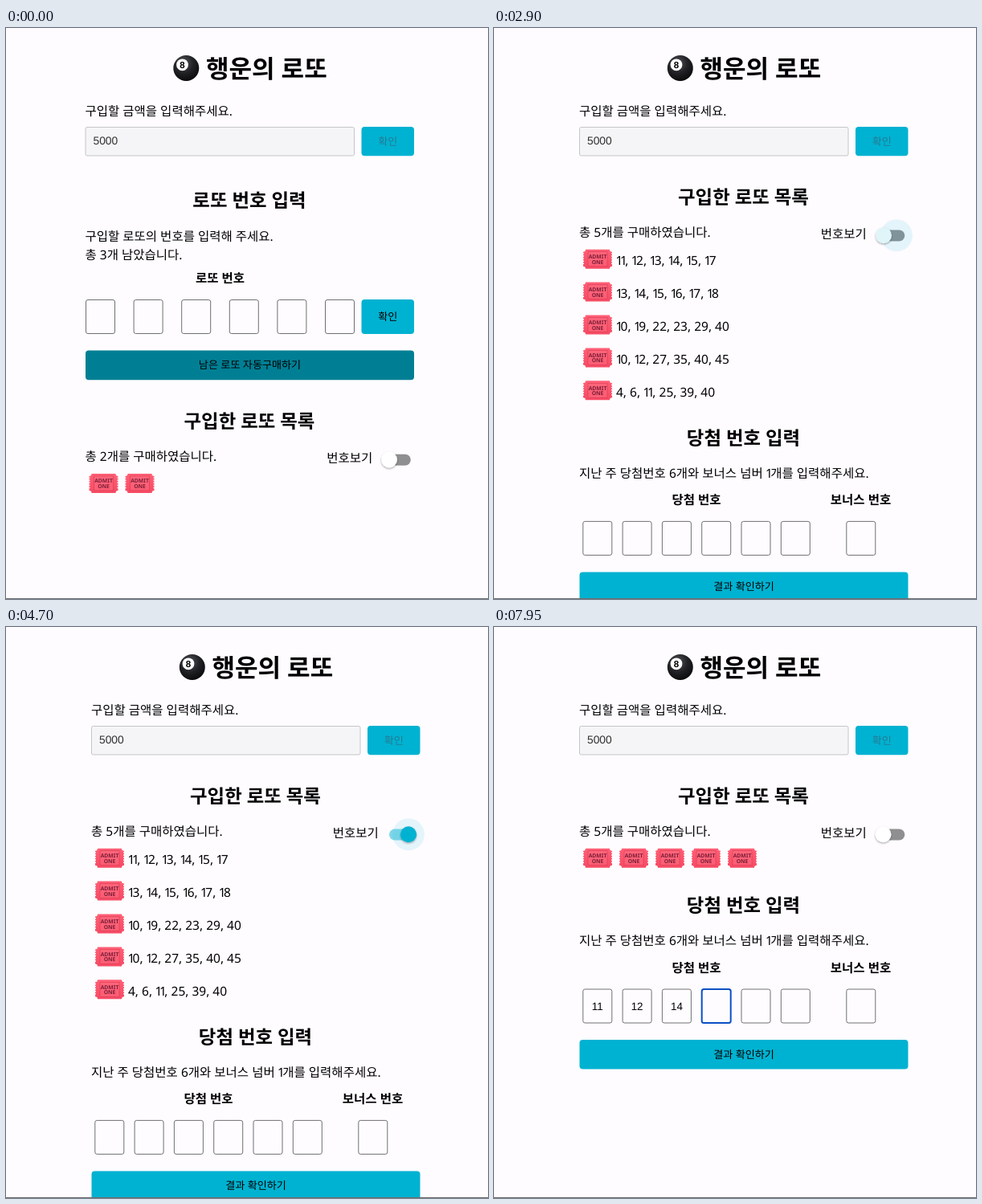
Recreate the animation shown at these times as an HTML page. Size 600x711 px, loop 8000 ms.

```html
<!DOCTYPE html>
<html lang="ko">
<head>
<meta charset="utf-8">
<title>행운의 로또</title>
<style>
  html, body { margin: 0; width: 100%; height: 100%; overflow: hidden; background: #fefcff; }
  svg { display: block; width: 600px; height: 711px; }
  text { font: 500 15.5px 'Noto Sans', 'Noto Sans CJK KR', 'Noto Sans CJK JP', sans-serif; text-rendering: geometricPrecision; white-space: pre; }
  .title { font-size: 31px; font-weight: 700; }
  .heading { font-size: 23.4px; font-weight: 700; }
  .label { font-weight: 700; }
  .button { font-size: 13.1px; }
  .input { font: 13.4px 'Liberation Sans', Arial, sans-serif; }
  .amount { font: 13.8px 'Liberation Sans', Arial, sans-serif; fill: #303030; }
  .stub { font: 700 6.8px 'Noto Sans', sans-serif; font-stretch: extra-condensed; fill: #7c1f38; }
  .eight { font: 700 11.5px 'Liberation Sans', Arial, sans-serif; }
</style>
</head>
<body>
<svg viewBox="0 0 600 711">
  <defs>
    <radialGradient id="ball" cx=".4" cy=".3" r=".75">
      <stop offset="0" stop-color="#55565a"/>
      <stop offset=".5" stop-color="#222326"/>
      <stop offset="1" stop-color="#08080a"/>
    </radialGradient>
    <linearGradient id="paper" x2="0" y2="1">
      <stop offset="0" stop-color="#ff6076"/>
      <stop offset="1" stop-color="#f64a64"/>
    </linearGradient>
    <filter id="shadow" x="-50%" y="-50%" width="200%" height="200%">
      <feDropShadow dx="0" dy="1.2" stdDeviation="1.3" flood-opacity=".38"/>
    </filter>
    <g id="ticket">
      <path d="M3 0H33Q33 3 36 3V21Q33 21 33 24H3Q3 21 0 21V3Q3 3 3 0Z" fill="url(#paper)"/>
      <path d="M.4 4.5V20M35.6 4.5V20" stroke="#fefcff" stroke-width="1.2" stroke-dasharray="1.4 1.7"/>
      <rect x="6" y="3" width="24" height="18" fill="#ff7084" fill-opacity=".45" stroke="#d93853" stroke-width=".6"/>
      <text class="stub" x="18" y="11.6" text-anchor="middle">ADMIT</text>
      <text class="stub" x="18" y="18" text-anchor="middle">ONE</text>
    </g>
  </defs>
  <g id="scene"></g>
  <path d="M0 710.5H600" stroke="#6c6c6e"/>
</svg>
<script>
const DURATION = 8000;
const CYAN = '#00b2d1', DARK_CYAN = '#007f94';
const PURCHASED = 450;                    // all tickets bought, winning form appears
const TOGGLES = [2885, 3500, 4150, 4750]; // alternately on and off
const HOVER = [2650, 5200];
const REFOCUS = 5200;
const KEYS = [[5850, '1'], [6050, '1'], [6350, '1'], [6500, '2'], [6850, '1'], [7350, '4']];
const TICKETS = [
  '11, 12, 13, 14, 15, 17',
  '13, 14, 15, 16, 17, 18',
  '10, 19, 22, 23, 29, 40',
  '10, 12, 27, 35, 40, 45',
  '4, 6, 11, 25, 39, 40'
];

const scene = document.getElementById('scene');
const clamp = v => Math.min(1, Math.max(0, v));
const smooth = v => v * v * (3 - 2 * v);
const mix = (a, b, k) => `rgb(${a.map((v, i) => Math.round(v + (b[i] - v) * k))})`;
const times = (n, draw) => Array.from({ length: n }, (_, i) => draw(i)).join('');
const shift = (x, y, content) => `<g transform="translate(${x} ${y})">${content}</g>`;

const text = (content, x, y, cls = '', attrs = '') =>
  `<text class="${cls}" x="${x}" y="${y}" ${attrs}>${content}</text>`;
const centered = (content, x, y, cls, attrs = '') =>
  text(content, x, y, cls, `text-anchor="middle" ${attrs}`);
// The digit 1 is set proportionally in running text.
const prose = (content, x, y) =>
  text(content.replace(/1/g, '<tspan dx="-.04em" letter-spacing="-.17em">1</tspan>'), x, y);

const button = (label, x, y, w, h, fill = CYAN, ink = '#000') =>
  `<rect x="${x}" y="${y}" width="${w}" height="${h}" rx="4" fill="${fill}"/>` +
  centered(label, x + w / 2, y + h / 2 + 4.4, 'button', `fill="${ink}"`);

function numberBox(x, y, value = '', focused = false, caret = false) {
  const stroke = focused ? 'stroke="#0a50c4" stroke-width="2"' : 'stroke="#6f6f72"';
  const caretX = x + 18.3 + value.length * 3.7;
  return `<rect x="${x}" y="${y}" width="36" height="42" rx="2.5" fill="none" ${stroke}/>` +
    centered(value, x + 18, y + 25.5, 'input') +
    (caret ? `<path d="M${caretX} ${y + 13}v16" stroke="#000"/>` : '');
}

const header = () =>
  `<circle cx="231.8" cy="50" r="16" fill="url(#ball)"/>
   <circle cx="227" cy="45.8" r="7.4" fill="#fff"/>` +
  centered('8', 227, 49.9, 'eight') +
  text('행운의 로또', 256.5, 61.5, 'title') +
  prose('구입할 금액을 입력해주세요.', 106, 109) +
  `<rect x="106.5" y="123.5" width="334.5" height="35.5" rx="2" fill="#f5f4f6" stroke="#c6c5c8"/>` +
  text('5000', 116, 145.3, 'amount') +
  button('확인', 450, 123, 65.5, 36.3, CYAN, '#237b95');

const manualForm = () =>
  centered('로또 번호 입력', 310.5, 223, 'heading') +
  prose('구입할 로또의 번호를 입력해 주세요.', 106, 264.5) +
  prose('총 3개 남았습니다.', 106, 288) +
  centered('로또 번호', 274, 317, 'label') +
  times(6, i => numberBox(107 + 59.6 * i, 338.5)) +
  button('확인', 450, 338, 65.5, 43) +
  button('남은 로또 자동구매하기', 106.5, 401.5, 409, 36.7, DARK_CYAN);

function switchState(t) {
  const flips = TOGGLES.filter(at => t >= at).length;
  const on = flips % 2 === 1;
  const progress = flips ? clamp((t - TOGGLES[flips - 1]) / 150) : 1;
  return { on, k: on ? smooth(progress) : 1 - smooth(progress) };
}

function toggle(t, { on, k }) {
  const hovered = t >= HOVER[0] && t < HOVER[1];
  const halo = on ? 'fill="#00b2d1" fill-opacity=".1"' : 'fill="#000" fill-opacity=".04"';
  const thumb = mix([255, 255, 255], [0, 178, 209], k ** .6);
  return `<rect x="477" y="251.5" width="34.3" height="14" rx="7" fill="${mix([143, 142, 144], [128, 215, 231], k)}"/>` +
    (hovered ? `<circle cx="${on ? 501 : 484.5}" cy="258.3" r="20" ${halo}/>` : '') +
    `<circle cx="${484.5 + 16.5 * k}" cy="258.3" r="10" fill="${thumb}" filter="url(#shadow)"/>`;
}

function ticketList(count, t, state) {
  const ticket = (x, y) => `<use href="#ticket" x="${x}" y="${y}"/>`;
  return centered('구입한 로또 목록', 310.5, 219, 'heading') +
    prose(`총 ${count}개를 구매하였습니다.`, 106, 260.3) +
    text('번호보기', 406.7, 262) +
    toggle(t, state) +
    times(count, i => state.on
      ? ticket(111, 275.7 + 40.9 * i) + prose(TICKETS[i], 152, 295 + 40.9 * i)
      : ticket(111 + 45 * i, 275.7));
}

function winningForm(t) {
  const pressed = KEYS.filter(([at]) => t >= at);
  const digits = pressed.map(([, key]) => key).join('');
  const hasFocus = t < TOGGLES[0] || t >= REFOCUS;
  const active = hasFocus ? Math.floor(digits.length / 2) : -1;
  const lastInput = pressed.length ? pressed[pressed.length - 1][0] : t >= REFOCUS ? REFOCUS : PURCHASED;
  const caretOn = (t - lastInput) % 1000 < 500;
  return centered('당첨 번호 입력', 310.5, 355.2, 'heading') +
    prose('지난 주 당첨번호 6개와 보너스 넘버 1개를 입력해주세요.', 106, 396.3) +
    centered('당첨 번호', 252, 430, 'label') +
    centered('보너스 번호', 456.5, 430, 'label') +
    times(6, i => numberBox(110.8 + 49.3 * i, 451, digits.slice(2 * i, 2 * i + 2),
      i === active, i === active && caretOn)) +
    numberBox(438.8, 451) +
    button('결과 확인하기', 106.5, 514, 409, 36.5);
}

function draw(t) {
  const state = switchState(t);
  if (t < PURCHASED) {
    return shift(-7.5, 0, header() + manualForm() + shift(0, 279.2, ticketList(2, t, state)));
  }
  return header() + ticketList(5, t, state) + shift(0, state.on ? 163.4 : 0, winningForm(t));
}

let shown = '';
function frame() {
  const markup = draw(performance.now() % DURATION);
  if (markup !== shown) scene.innerHTML = shown = markup;
  requestAnimationFrame(frame);
}
frame();
</script>
</body>
</html>
```
